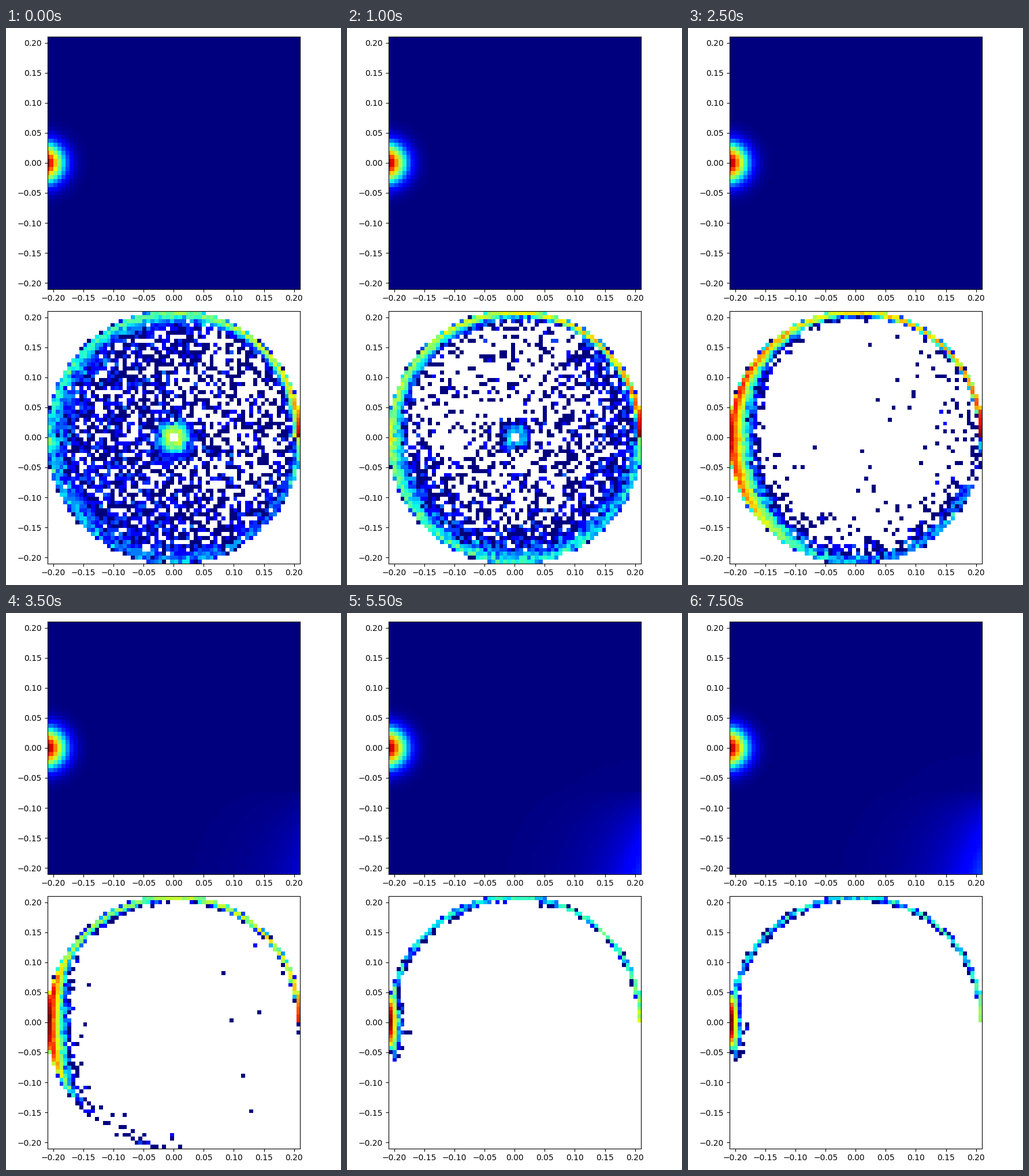
These frames come from a looping animation (580x966 px, 8000 ms). A matplotlib script:

```python
import numpy as np
import matplotlib.pyplot as plt
from matplotlib.animation import FuncAnimation
from matplotlib.colors import LogNorm

W, H, SIDE = 580, 966, 437.5
LEFT, TOPS = 71.5, (15.1, 491.1)
R = 0.21
BINS = 64
CELL = 2 * R / BINS
FRAMES, STEP = 16, 500

plt.rcParams.update({"font.family": "DejaVu Sans", "font.size": 10})


def fade(t, tau):
    return np.exp(-t / tau)


def drop(t, mid, width):
    """Smooth step from one down to zero."""
    return 1 / (1 + np.exp((t - mid) / width))


def bump(t, mid, width):
    return np.exp(-((t - mid) / width) ** 2)


def polar(r, angle):
    a = np.radians(angle)
    return r * np.cos(a), r * np.sin(a)


def wall(rng, angle, depth):
    """Particles hugging the wall; the layer thickens from east to west."""
    grow = np.clip((angle - 20) / 160, 0.2, 1)
    r = R - rng.exponential(1, angle.size) * depth * grow * CELL
    return polar(r[r > 0], angle[r > 0])


def arc(rng, t):
    n = int(800 + 4700 * drop(t, 3.4, 0.6))
    angle = 180 * rng.random(n) ** (1 + fade(t, 1))
    return wall(rng, angle, 0.5 + 1.6 * fade(t, 1))


def west(rng, t):
    n = int(9000 * bump(t, 2.8, 1.1) + 2500 * drop(-t, -3, 0.4))
    angle = rng.normal(180, 5 + 35 * drop(t, 2.7, 0.6), n)
    return wall(rng, angle, 0.5 + 0.8 * drop(t, 3.5, 0.6))


def south(rng, t):
    n = int(2400 * (1 - 0.55 * fade(t, 0.6)) * drop(t, 2.5, 0.3))
    span = 20 + 160 * drop(t, 3.4, 0.5)
    return wall(rng, 180 + span * rng.random(n) ** 1.5, 1.5)


def source(rng, t):
    n = int(100 + 1300 * drop(t, 3.6, 0.6))
    angle = rng.exponential(10, n)
    angle[rng.random(n) < 0.15 * fade(t, 1)] *= -1
    return wall(rng, angle, 0.6)


def haze(rng, t):
    n = int(1500 * (1 - 0.7 * fade(t, 0.3)) * drop(t, 1.9, 0.35))
    return wall(rng, rng.uniform(190, 415, n), 6)


def core(rng, t):
    n = int(1000 * bump(t, 0, 0.75))
    return polar(0.0095 + rng.exponential(0.008, n), rng.uniform(0, 360, n))


def fill(rng, t):
    """Thinning scatter over the disk, at first denser in the west."""
    n = int(5400 * fade(t, 0.8) * np.exp(-(t / 2) ** 4))
    x, y = polar(R * np.sqrt(rng.random(n)), rng.uniform(0, 360, n))
    tilt = 1.25 * fade(t, 0.35) - 0.35
    keep = rng.random(n) < 0.5 * (1 - tilt * x / R)
    return x[keep], y[keep]


def density(frame):
    rng = np.random.default_rng(100 + frame)
    t = frame * STEP / 1000
    groups = [g(rng, t) for g in (arc, west, south, source, haze, core, fill)]
    x, y = (np.concatenate(c) for c in zip(*groups))
    free = np.hypot(x, y) > 0.0093
    edges = np.linspace(-R, R, BINS + 1)
    counts = np.histogram2d(y[free], x[free], bins=[edges, edges])[0]
    return np.ma.masked_equal(counts, 0)


NODES = np.linspace(-R, R, BINS)
DX = NODES[1] - NODES[0]
GX, GY = np.meshgrid(NODES, NODES)


def field(frame):
    t = frame * STEP / 1000
    shift = 0.4 + 0.56 * fade(t, 0.9)
    i, j = (GX + R) / DX, GY / DX
    spot = np.exp(-((i + shift) ** 2 - shift ** 2 + j ** 2) / 22)
    amp = 0.2 * (1 - fade(max(t - 2.7, 0), 1.8))
    dx = R - GX
    rise = np.clip((-0.07 - GY) / 0.14, 0, 1) ** 0.8
    glow = np.exp(-dx / 0.05) * rise
    glow += 0.1 * np.exp(-(dx ** 2 + (GY + R) ** 2) / 0.16 ** 2)
    return spot + amp * glow


def panel(top, data, half, norm=None):
    ax = fig.add_axes([LEFT / W, 1 - (top + SIDE) / H, SIDE / W, SIDE / H])
    e = R + half
    image = ax.imshow(data, cmap="jet", norm=norm, origin="lower",
                      extent=[-e, e, -e, e], interpolation="nearest",
                      aspect="auto")
    ticks = np.arange(-4, 5) * 0.05
    ax.set(xlim=(-R, R), ylim=(-R, R), xticks=ticks, yticks=ticks)
    return image


fig = plt.figure(figsize=(W / 100, H / 100), dpi=100, facecolor="white")
upper = panel(TOPS[0], field(0), DX / 2)
lower = panel(TOPS[1], density(0), 0, LogNorm(1, 250))


def update(frame):
    f, d = field(frame), density(frame)
    upper.set_data(f)
    upper.set_clim(0, f.max())
    lower.set_data(d)
    lower.set_clim(1, d.max())
    return upper, lower


anim = FuncAnimation(fig, update, frames=FRAMES, interval=STEP,
                     repeat=True, repeat_delay=0, blit=False)
plt.show()
```
